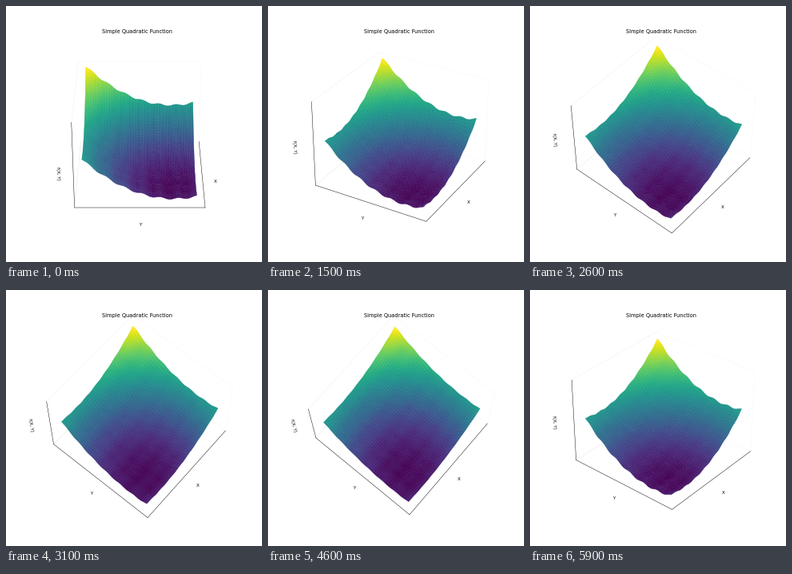
Animation of 320 by 320 pixels, one loop 6000 ms. Source, as a matplotlib script:

```python
import numpy as np
import matplotlib.pyplot as plt
from matplotlib.animation import FuncAnimation

FRAMES = 60
INTERVAL = 100
LOW, HIGH = -4, 1


def surface(x, y):
    """Paraboloid with a faint ripple along both axes."""
    return x**2 + y**2 + 0.2 * np.cos(3 * np.pi * x) + 0.35 * np.sin(8 * y)


def cell_colors(z):
    """Viridis colour of each grid cell, from the mean of its corners."""
    mean = (z[:-1, :-1] + z[1:, :-1] + z[:-1, 1:] + z[1:, 1:]) / 4
    return plt.get_cmap("viridis")(plt.Normalize(mean.min(), mean.max())(mean))


def camera(i):
    """Elevation and azimuth: swing sideways, rise overhead, come back down."""
    if i < 20:
        return 30, 2 * i
    if i < 40:
        return 30 + 3 * (i - 20), 40
    return 90 - 3 * (i - 40), 40


def padded(low, high, margin):
    pad = (high - low) * margin
    return low - pad, high + pad


fig = plt.figure(figsize=(8, 8), dpi=40, facecolor="white")
ax = fig.add_subplot(projection="3d")

steps = np.linspace(LOW, HIGH, 50)
X, Y = np.meshgrid(steps, steps)
Z = surface(X, Y)
# Edges in the face colours close the seams between cells.
ax.plot_surface(X, Y, Z, facecolors=cell_colors(Z), shade=False,
                rstride=1, cstride=1, linewidth=0.7)

side = padded(*padded(LOW, HIGH, 0.05), 1 / 48)
ax.set(xlim=side, ylim=side, zlim=padded(Z.min(), Z.max(), 1 / 48),
       xticks=[], yticks=[], zticks=[],
       xlabel="X", ylabel="Y", zlabel="f(X, Y)")
ax.set_title("Simple Quadratic Function", pad=7.5)
for axis in (ax.xaxis, ax.yaxis, ax.zaxis):
    axis.pane.set_fill(False)


def update(i):
    elev, azim = camera(i)
    ax.view_init(elev=elev, azim=azim)
    return []


anim = FuncAnimation(fig, update, frames=FRAMES, interval=INTERVAL,
                     init_func=lambda: update(0), repeat=True,
                     repeat_delay=0, blit=False)
plt.show()
```
